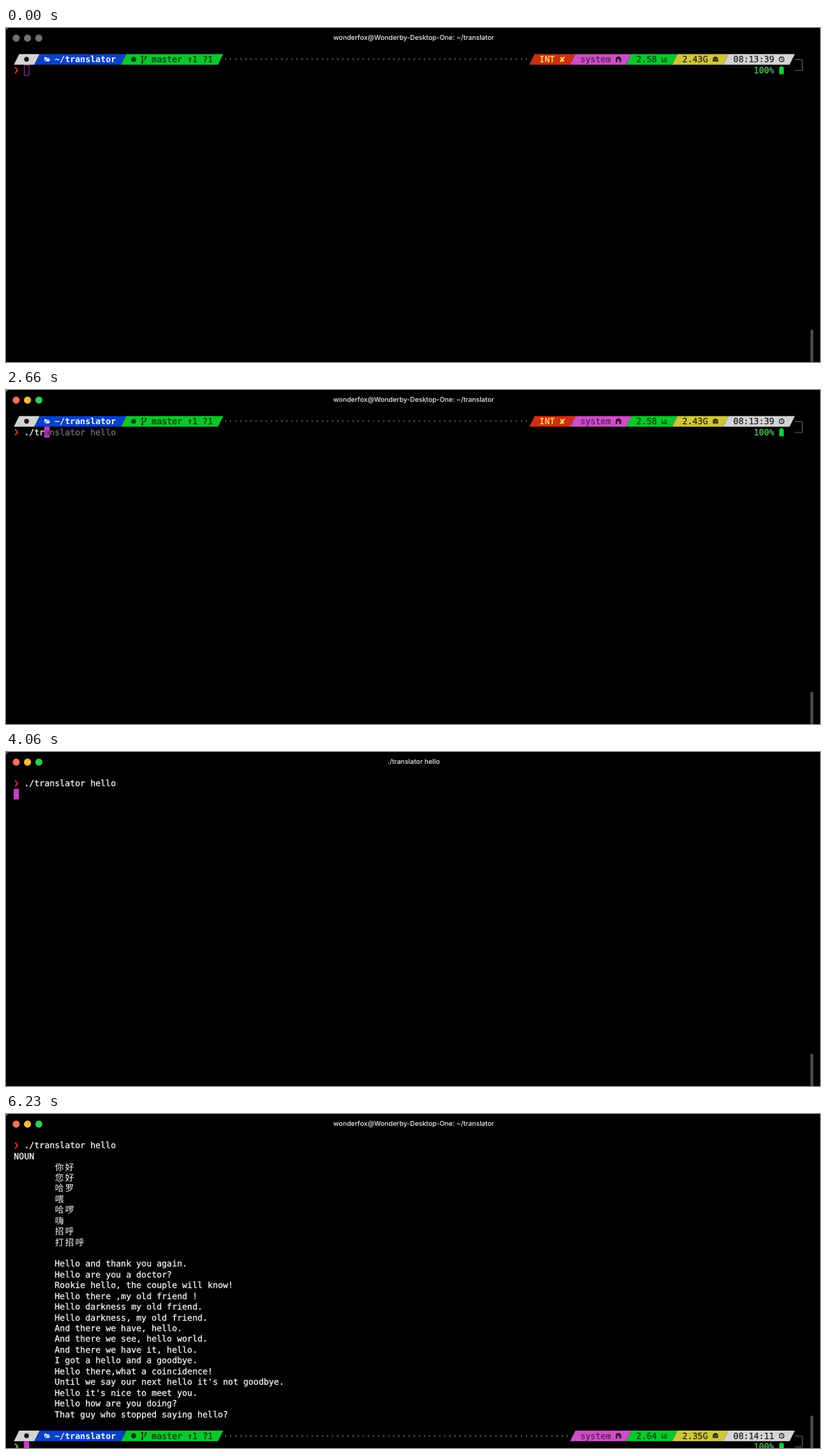
Animation, 1167 px wide and 480 px high, one loop 6.3 s. Source, as an HTML page:

```html
<!DOCTYPE html>
<html lang="en">
<head>
<meta charset="utf-8">
<title>Terminal translator</title>
<style>
  html, body { margin: 0; width: 100%; height: 100%; overflow: hidden; background: #000; }
  svg { display: block; width: 100vw; height: 100vh; }
  text { white-space: pre; text-rendering: geometricPrecision; }
  .mono { font: 12.15px "DejaVu Sans Mono", monospace; stroke-width: .25px; }
  .cjk { font: 500 12.6px "Noto Sans CJK SC", "Noto Sans CJK", sans-serif; }
  .title { font: 500 9.6px Inter, sans-serif; fill: #f2f2f2; text-anchor: middle; }
  .bold { font-weight: bold; stroke-width: 0; }
  .hidden { display: none; }
</style>
</head>
<body>
<svg viewBox="0 0 1167 480" id="stage"></svg>
<script>
const LOOP = 6300, STEP = 70;
const FOCUS = 1540, RUN = 3990, DONE = 4130;
const CELL = 7.316, ROW = 15.46;
const COMMAND = './translator hello';
const WHITE = '#fafafa', CURSOR = '#cb3dc5';

const colX = col => 11.3 + col * CELL;
const rowY = row => 45 + row * ROW;

const text = (col, row, str, fill = WHITE, cls = '') =>
  `<text class="mono ${cls}" x="${colX(col)}" y="${rowY(row) + 4.2}" fill="${fill}" stroke="${fill}">${str}</text>`;

const cjk = (row, str) => [...str].map((ch, i) =>
  `<text class="cjk" x="${colX(8 + i * 2) + .3}" y="${rowY(row) + 4.6}" fill="${WHITE}">${ch}</text>`).join('');

const segment = (from, to, fill) => {
  const a = colX(from), b = colX(to);
  return `<path fill="${fill}" d="M${a} 7.8L${a + 7.6} -7.5H${b + 7.6}L${b} 7.8Z"/>`;
};

const chevron = (row, color) =>
  `<path d="M13 ${rowY(row) - 4.2}l3.6 4.4l-3.6 4.4" fill="none" stroke="${color}" stroke-width="2"/>`;

const block = (col, row) =>
  `<rect x="${colX(col) - .3}" y="${rowY(row) - 7.6}" width="7.6" height="15.4" fill="${CURSOR}"/>`;

// Small status symbols, drawn around the row's centre line
const folder = '<path d="M55-3h3l1 1h3v1.5h-5l-2 3z M56.3 3l1.6-3h5.6l-1.8 3z" fill="#e8edff"/>';
const branch = `<g fill="none" stroke="#063b10" stroke-width="1.2">
  <path d="M195.4-4V4.5M200.3-3V-1.5Q200.3.5 195.4 1.5"/>
  <circle cx="195.4" cy="-4" r="1"/><circle cx="200.3" cy="-3.5" r="1"/><circle cx="195.4" cy="4.5" r="1"/></g>`;
const home = '<path d="M874 4V0Q874-4 878-4T882 0V4H879.5V0H876.5V4Z" fill="#3c1039"/>';
const chart = '<path d="M940.5-3V3.5H948M942.7 2.5V0M944.7 2.5V-2M946.8 2.5V-3" fill="none" stroke="#064512"/>';
const gauge = `<path d="M1013.3 3.2V0A3.8 3.8 0 0 1 1020.9 0V3.2Z" fill="#2c2a0c"/>
  <path d="M1017 2L1019-1.2M1014.6 0h1" stroke="#cfc63b"/>`;
const clock = '<g fill="none" stroke="#222"><circle cx="1112" cy="0" r="3.3" stroke-width="1.2"/><path d="M1112-2V.3H1113.5" stroke-width=".9"/></g>';

function prompt(row, {load, memory, time, failed}) {
  const rightStart = failed ? 101 : 109;
  const shapes = [
    segment(0, 4, '#d2d5d2'), segment(4, 21, '#0a41cb'), segment(21, 40, '#0bc72d'),
    failed ? segment(101, 109, '#cd2e14') : '',
    segment(109, 120, '#cc4fc5'), segment(120, 129, '#0bc72d'),
    segment(129, 139, '#cfc63b'), segment(139, 152, '#d2d5d2'),
    '<circle cx="29.5" cy="0" r="3.4" fill="#181818"/>',
    '<circle cx="183" cy="0" r="3.6" fill="#063b10"/>',
    folder, branch, home, chart, gauge, clock,
    '<path d="M1131 .5H1141.5V16H1131" fill="none" stroke="#696969"/>',
    '<path d="M1108.5 11.2h1.8v-1.4h3v1.4h1.8v10.4h-6.6z" fill="#13cf39"/>'
  ].join('');
  return `<g transform="translate(0 ${rowY(row)})">${shapes}</g>` +
    text(8, row, '~/translator', '#f4f6ff', 'bold') +
    text(27, row, 'master ↑1 ?1', '#06360e') +
    text(41, row, '·'.repeat(rightStart - 41), '#666') +
    (failed ? text(103, row, 'INT ✘', '#f5e94e') : '') +
    text(111, row, 'system', '#5c1b58') +
    text(122, row, load, '#064512') +
    text(131, row, memory, '#2c2a0c') +
    text(141, row, time, '#202020') +
    text(145, row + 1, '100%', '#56c964');
}

const words = ['你好', '您好', '哈罗', '喂', '哈啰', '嗨', '招呼', '打招呼'];
const sentences = [
  'Hello and thank you again.', 'Hello are you a doctor?',
  'Rookie hello, the couple will know!', 'Hello there ,my old friend !',
  'Hello darkness my old friend.', 'Hello darkness, my old friend.',
  'And there we have, hello.', 'And there we see, hello world.',
  'And there we have it, hello.', 'I got a hello and a goodbye.',
  'Hello there,what a coincidence!', "Until we say our next hello it's not goodbye.",
  "Hello it's nice to meet you.", 'Hello how are you doing?',
  'That guy who stopped saying hello?'
];

const lights = colors => colors.map((fill, i) =>
  `<circle cx="${14.6 + i * 16.25}" cy="14.6" r="5.1" fill="${fill}"/>`).join('');
const title = str => `<text class="title" x="584.5" y="17.3">${str}</text>`;
const group = (id, content) => `<g id="${id}">${content}</g>`;

document.getElementById('stage').innerHTML =
  '<rect width="1167" height="480"/><path d="M0 0H4Q1 1 0 4Z" fill="#59636d"/>' +
  '<rect x="1153.3" y="433.5" width="4" height="50" rx="1.5" fill="#4d4d4d"/>' +
  group('blurred', lights(['#707070', '#707070', '#707070']) +
    '<rect x="26.2" y="53.4" width="6.8" height="14.8" fill="none" stroke="#a03aa0"/>') +
  group('focused', lights(['#f46f60', '#f5be3d', '#2fcf55'])) +
  group('shellTitle', title('wonderfox@Wonderby-Desktop-One: ~/translator')) +
  group('runTitle', title(COMMAND)) +
  group('editing', prompt(0, {load: '2.58', memory: '2.43G', time: '08:13:39', failed: true}) +
    chevron(1, '#d83018')) +
  group('typing', '') +
  group('entered', chevron(0, '#d83018') + text(2, 0, COMMAND)) +
  group('waiting', block(0, 1)) +
  group('output', text(0, 1, 'NOUN') +
    words.map((word, i) => cjk(i + 2, word)).join('') +
    sentences.map((line, i) => text(8, i + 11, line)).join('') +
    prompt(27, {load: '2.64', memory: '2.35G', time: '08:14:11', failed: false}) +
    chevron(28, '#62b83c') + block(2, 28));

const byId = id => document.getElementById(id);
const show = (id, visible) => byId(id).classList.toggle('hidden', !visible);

function typedCount(t) {
  if (t < 1680) return 0;
  if (t < 1820) return 1;
  if (t < 2100) return 2;
  if (t < 2660) return 3;
  if (t < 3360) return 3 + Math.round((Math.floor((t - 2660) / STEP) + 1) * 1.3);
  return t < 3500 ? 17 : 18;
}

function typingLine(count) {
  const col = 2 + count;
  const rest = count ? COMMAND.slice(count) : '';
  return text(2, 1, COMMAND.slice(0, count)) + block(col, 1) +
    text(col, 1, rest.slice(0, 1), '#5f1d5d') + text(col + 1, 1, rest.slice(1), '#777');
}

let shownCount = -1;
function draw(t) {
  const focused = t >= FOCUS, running = t >= RUN, done = t >= DONE;
  show('blurred', !focused);
  show('focused', focused);
  show('editing', !running);
  show('typing', focused && !running);
  show('entered', running);
  show('waiting', running && !done);
  show('output', done);
  show('runTitle', running && !done);
  show('shellTitle', !running || done);
  const count = typedCount(t);
  if (count !== shownCount) byId('typing').innerHTML = typingLine(shownCount = count);
}

const start = performance.now();
function tick() {
  draw((performance.now() - start) % LOOP);
  requestAnimationFrame(tick);
}
tick();
</script>
</body>
</html>
```
